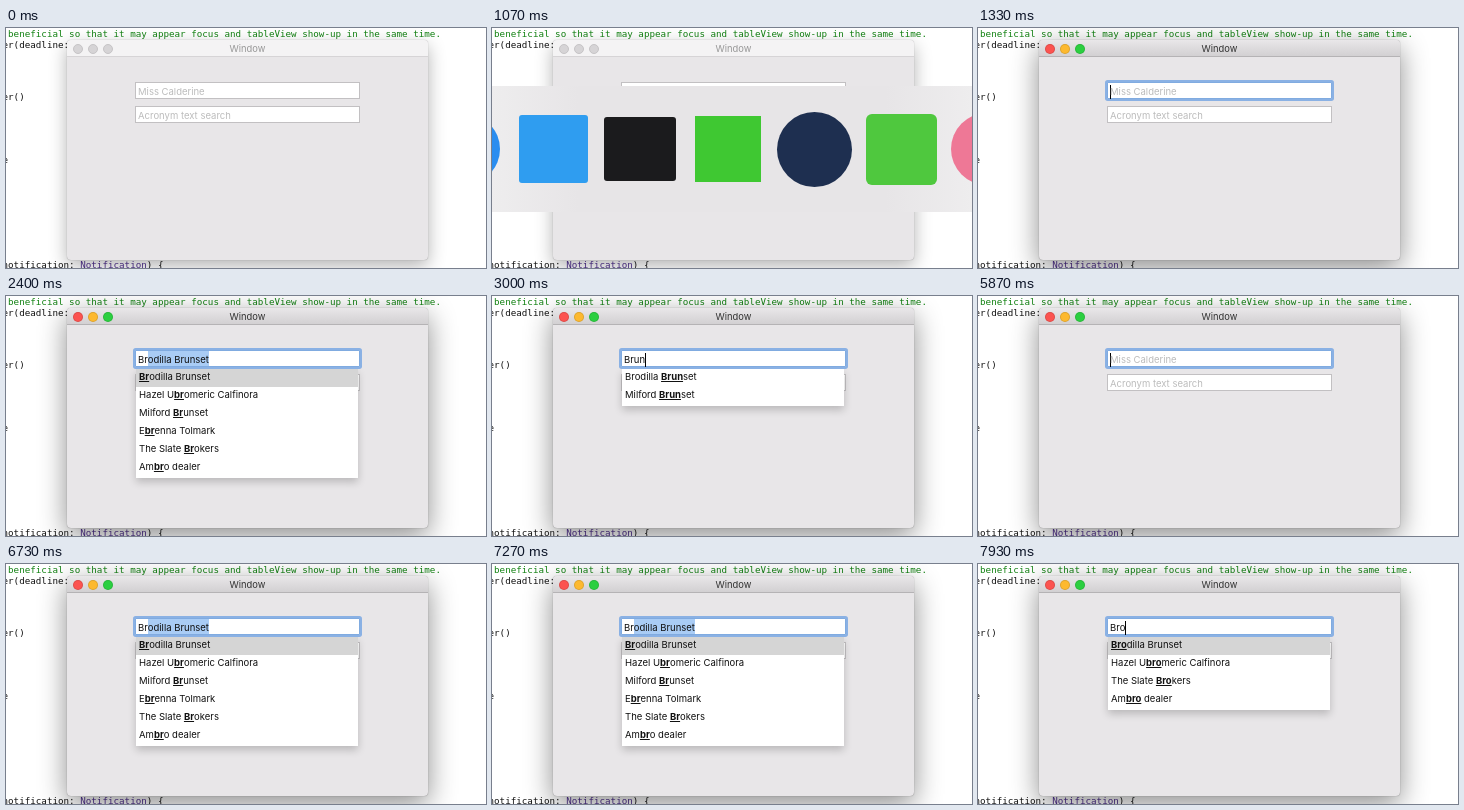
Write an HTML page that moves like this. It is 480 px wide and 240 px high and loops after 8 s.

```html
<!DOCTYPE html>
<html lang="en">
<head>
<meta charset="utf-8">
<title>Suggestion field</title>
<style>
  html, body { margin: 0; width: 100%; height: 100%; overflow: hidden; background: #fff; }
  #stage { position: relative; width: 480px; height: 240px; overflow: hidden; font: 9.5px Inter, sans-serif; color: #111; }
  #stage div { position: absolute; box-sizing: border-box; }
  .code { left: -3.5px; font: 9.23px/12px "DejaVu Sans Mono", monospace; white-space: pre; }

  #window { left: 61px; top: 12px; width: 361px; height: 220px; border-radius: 4px; background: #e8e6e8;
    box-shadow: 0 0 1px rgba(0,0,0,.4), 0 6px 18px rgba(0,0,0,.3); }
  #bar { left: 0; top: 0; width: 100%; height: 17px; border-radius: 4px 4px 0 0; background: #f4f3f4; border-bottom: 1px solid #d6d4d6;
    font-size: 9.4px; line-height: 18px; text-align: center; color: #989898; }
  .light { top: 4px; width: 10px; height: 10px; border-radius: 50%; background: #d6d4d6; border: 1px solid #c6c4c6; }
  .active #window { box-shadow: 0 0 1px rgba(0,0,0,.5), 0 8px 28px rgba(0,0,0,.45); }
  .active #bar { background: linear-gradient(#e9e7e9, #d2d0d2); border-color: #b5b3b5; color: #333; }
  .active .light { background: var(--color); border-color: rgba(0,0,0,.12); }

  .field { left: 129px; width: 225px; height: 17px; padding-left: 2px; background: #fff; border: 1px solid #c2c0c2; line-height: 17px; white-space: pre; }
  .hint { color: #bcbcbc; }
  .active #search { border-color: #80abe0; border-radius: 1px; box-shadow: 0 0 0 2px #8ab1e4; }
  .selected { display: inline-block; height: 15px; background: #a9ccf5; }
  .caret { display: inline-block; width: 1px; height: 14px; margin-right: -1px; background: #000; vertical-align: middle; }

  #list { left: 130px; top: 73px; width: 222px; padding-bottom: 1px; background: #fff; box-shadow: 0 4px 8px rgba(0,0,0,.2); }
  #list p { margin: 0; height: 18px; padding-left: 3px; line-height: 16px; }
  #list p.current { background: #d5d5d5; }
  #list b { text-decoration: underline; }

  #switcher { left: 0; top: 58px; width: 480px; height: 126px; background: linear-gradient(90deg, #eeedee, #e7e5e7 18%, #e7e5e7 82%, #eeedee); }
</style>
</head>
<body>
<div id="stage">
  <div class="code" style="top:0;color:#128212"> beneficial so that it may appear focus and tableView show-up in the same time.</div>
  <div class="code" style="top:11px">er(deadline:</div>
  <div class="code" style="top:63px">er()</div>
  <div class="code" style="top:126px">e</div>
  <div class="code" style="top:231px">notification: <span style="color:#4f2f8f">Notification</span>) {</div>
  <div id="window">
    <div id="bar">Window</div>
    <div class="light" style="left:6px;--color:#fc5350"></div>
    <div class="light" style="left:21px;--color:#fdb92f"></div>
    <div class="light" style="left:36px;--color:#2bcf40"></div>
  </div>
  <div class="field hint" style="top:78px">Acronym text search</div>
  <div id="list"></div>
  <div class="field" id="search" style="top:54px"></div>
  <div id="switcher"></div>
</div>
<script>
const LOOP = 8000;
const SWITCHER_ON = 870, ACTIVATE = 1200, SWITCHER_OFF = 1270;
const HINT = "Miss Calderine";
const people = [
  "Brodilla Brunset", "Hazel Ubromeric Calfinora", "Milford Brunset",
  "Ebrenna Tolmark", "The Slate Brokers", "Ambro dealer"
];
const [first, , third] = people;

// start time, query, shown text, highlighted row, start of the selection
const steps = [
  [0, "", "", -1],
  [2000, "B", first, 0, 1],
  [2270, "Br", first, 0, 2],
  [2530, "Bru", "Bru", -1],
  [2870, "Brun", "Brun", -1],
  [3270, "Bruns", "Bruns", -1],
  [3670, "Bruns", first, 0],
  [4070, "Bruns", third, 1],
  [4870, "", third, -1],
  [5270, "", third, -1, 0],
  [5600, "", "", -1],
  [6270, "B", first, 0, 1],
  [6530, "Br", first, 0, 2],
  [7400, "Bro", "Bro", 0]
];

// centre x, width, height, corner radius, colour
const icons = [
  [-27, 70, 70, "50%", "#2a8df0"],
  [61.5, 69, 68, "3px", "#2f9df0"],
  [148, 72, 64, "3px", "#1b1b1d"],
  [236, 66, 66, "0", "#3fc832"],
  [322, 75, 75, "50%", "#1e2f50"],
  [409.5, 71, 71, "6px", "#4fc83e"],
  [495, 72, 72, "50%", "#ee7896"]
];

const byId = id => document.getElementById(id);
const stage = byId("stage"), search = byId("search"), list = byId("list"), switcher = byId("switcher");

switcher.innerHTML = icons.map(([x, w, h, radius, color]) =>
  `<div style="left:${x - w / 2}px;top:${63 - h / 2}px;width:${w}px;height:${h}px;border-radius:${radius};background:${color}"></div>`
).join("");

function fieldHtml(text, from, active) {
  const caret = active ? '<i class="caret"></i>' : "";
  if (!text) return `${caret}<span class="hint">${HINT}</span>`;
  if (from === undefined) return text + caret;
  return `${text.slice(0, from)}<span class="selected">${text.slice(from)}</span>`;
}

function listHtml(query, row) {
  const position = name => name.toLowerCase().indexOf(query.toLowerCase());
  return people.filter(name => position(name) >= 0).map((name, i) => {
    const start = position(name), end = start + query.length;
    const label = `${name.slice(0, start)}<b>${name.slice(start, end)}</b>${name.slice(end)}`;
    return `<p class="${i === row ? "current" : ""}">${label}</p>`;
  }).join("");
}

let shown = "";
function render(t) {
  const active = t >= ACTIVATE;
  const step = steps.findLast(([start]) => t >= start);
  const fade = (SWITCHER_OFF - t) / (SWITCHER_OFF - ACTIVATE);
  switcher.style.opacity = t < SWITCHER_ON ? 0 : Math.max(0, Math.min(1, fade));

  const key = step[0] + "/" + active;
  if (key === shown) return;
  shown = key;
  const [, query, text, row, from] = step;
  stage.className = active ? "active" : "";
  search.innerHTML = fieldHtml(text, from, active);
  list.style.display = query ? "block" : "none";
  list.innerHTML = query ? listHtml(query, row) : "";
}

const origin = performance.now();
function tick() {
  render((performance.now() - origin) % LOOP);
  requestAnimationFrame(tick);
}
tick();
</script>
</body>
</html>
```
